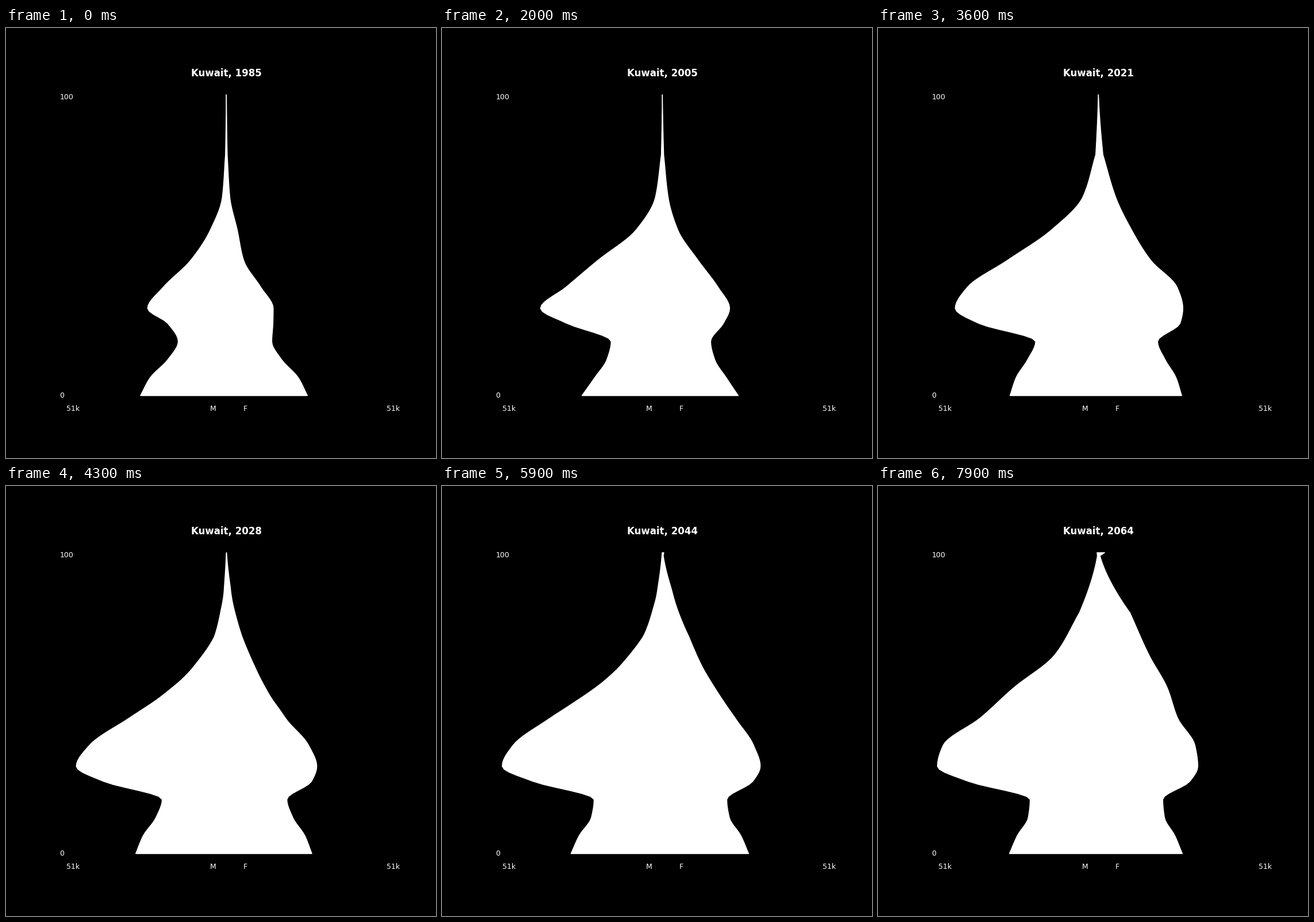
A matplotlib script for the animation above (8000 ms loop, 748 by 748 pixels).

```python
import numpy as np
import matplotlib.pyplot as plt
from matplotlib.animation import FuncAnimation
from matplotlib.patches import Polygon

SIZE, DPI = 748, 100
START, YEARS, STEP_MS = 1985, 80, 100
HALF = 0.3875 * SIZE  # half the axes width, so widths are in pixels
BOYS_PER_GIRL = 1.06

KNOTS = np.array([0, 6, 12, 18, 24, 29, 36, 45, 55, 66, 80])
AGES = np.arange(101)
keys = {}


def monotone(x, xs, ys):
    """Cubic curve through the points that never overshoots them."""
    h, d = np.diff(xs), np.diff(ys) / np.diff(xs)
    same = d[:-1] * d[1:] > 0
    total = np.where(same, d[:-1] + d[1:], 1)
    inner = np.where(same, 2 * d[:-1] * d[1:] / total, 0)
    m = np.concatenate([d[:1], inner, d[-1:]])
    i = np.clip(np.searchsorted(xs, x, side="right") - 1, 0, len(h) - 1)
    u = (x - xs[i]) / h[i]
    s = u * u * (3 - 2 * u)
    return (ys[i] * (1 - s) + ys[i + 1] * s
            + h[i] * u * (1 - u) * (m[i] * (1 - u) - m[i + 1] * u))


def profile(widths):
    """Curve to age 80, a fading tail, and an open 100+ group."""
    w80 = widths[-1]
    body = monotone(np.minimum(AGES, 80), KNOTS, np.array(widths, float))
    tail = w80 * ((102 - AGES) / 22) ** 1.5
    out = np.where(AGES > 80, tail, body)
    out[100] = 11 * (w80 / 55) ** 3
    return out


def pose(year, girls, women, men):
    boys = [BOYS_PER_GIRL * g for g in girls]
    keys[year] = np.array([profile(boys + men), profile(girls + women)])


def ease(x, lo, hi):
    u = np.clip((x - lo) / (hi - lo), 0, 1)
    return u * u * (3 - 2 * u)


def bump(center, spread, male, female):
    return np.outer([male, female], np.exp(-((AGES - center) / spread) ** 2 / 2))


def widths_at(year):
    """Young ages change in place; older ones move up with their birth cohort."""
    if year in keys:
        return keys[year]
    y0 = max(k for k in keys if k < year)
    y1 = min(k for k in keys if k > year)
    a, b, s = keys[y0], keys[y1], (year - y0) / (y1 - y0)
    still = (1 - s) * a + s * b
    before = np.clip(AGES - (year - y0), 0, 99)
    after = np.clip(AGES + (y1 - year), 0, 99)
    cohort = (1 - s) * a[:, before] + s * b[:, after]
    mix = ease(AGES, 42, 56) * (1 - ease(AGES, 80, 90))
    return still + mix * (cohort - still)


pose(1985, [141, 125, 96, 79], [81, 81.5, 60, 30, 19, 6, 1.5], [102, 137, 110, 62, 28, 7, 1.6])
pose(1994, [103, 112, 71, 66], [73, 81, 66, 33, 15, 5.5, 1.5], [93, 127, 120, 62, 24, 7, 1.4])
pose(2005, [132, 111, 91, 84], [106, 117, 97, 62, 27, 10, 2.3], [166, 212, 168, 112, 46, 12, 1.8])
pose(2021, [145, 135, 116, 103], [142, 147, 137, 91, 58, 30, 8], [208, 249, 228, 158, 82, 27, 4.6])
pose(2036, [153, 138, 115, 108], [155, 169, 150, 115, 76, 48, 22], [220, 275, 250, 183, 100, 39, 11])
pose(2052, [147, 135, 118, 116], [157, 167, 165, 138, 102, 69, 40], [226, 275, 266, 208, 127, 55, 21])
pose(2064, [146, 133, 115, 112], [159, 173, 168, 138, 120, 88, 55], [226, 280, 270, 206, 148, 76, 33])

# Migration peaks, the 1990 exodus and the 2012 birth peak.
keys.update({
    1990: keys[1985] + bump(29, 7, 66, 28) + bump(0, 6, 3, 3),
    1992: keys[1994] * 0.93,
    2012: widths_at(2012) + bump(0, 4, 12, 12) + bump(28, 4, 5, 2),
    2040: widths_at(2040) + bump(30, 5, 5.5, 3.5),
})

fig = plt.figure(figsize=(SIZE / DPI, SIZE / DPI), dpi=DPI, facecolor="black")
ax = fig.add_axes([0.125, 0.11, 0.775, 0.77])
ax.set_axis_off()
ax.set_xlim(-HALF, HALF)
ax.set_ylim(-5, 105)

shape = Polygon(np.zeros((3, 2)), closed=True, color="white", lw=1, joinstyle="round")
ax.add_patch(shape)


def label(x, y, text, size=9, **kw):
    return ax.text(x, y, text, transform=ax.transAxes, color="white",
                   fontsize=size, family="DejaVu Sans", **kw)


title = label(0.5, 1.01, "", 12, weight="bold", ha="center")
for x, y, text in [(0, 0.94, "100"), (0, 0.04, "0"), (0.02, 0, "51k"),
                   (0.45, 0, "M"), (0.55, 0, "F"), (0.98, 0, "51k")]:
    label(x, y, text)


def draw(i):
    male, female = widths_at(START + i)
    left = np.column_stack([-male, AGES])
    right = np.column_stack([female, AGES])[::-1]
    shape.set_xy(np.vstack([left, right]))
    title.set_text(f"Kuwait, {START + i}")
    return shape, title


anim = FuncAnimation(fig, draw, frames=YEARS, interval=STEP_MS,
                     repeat=True, repeat_delay=0)
plt.show()
```
